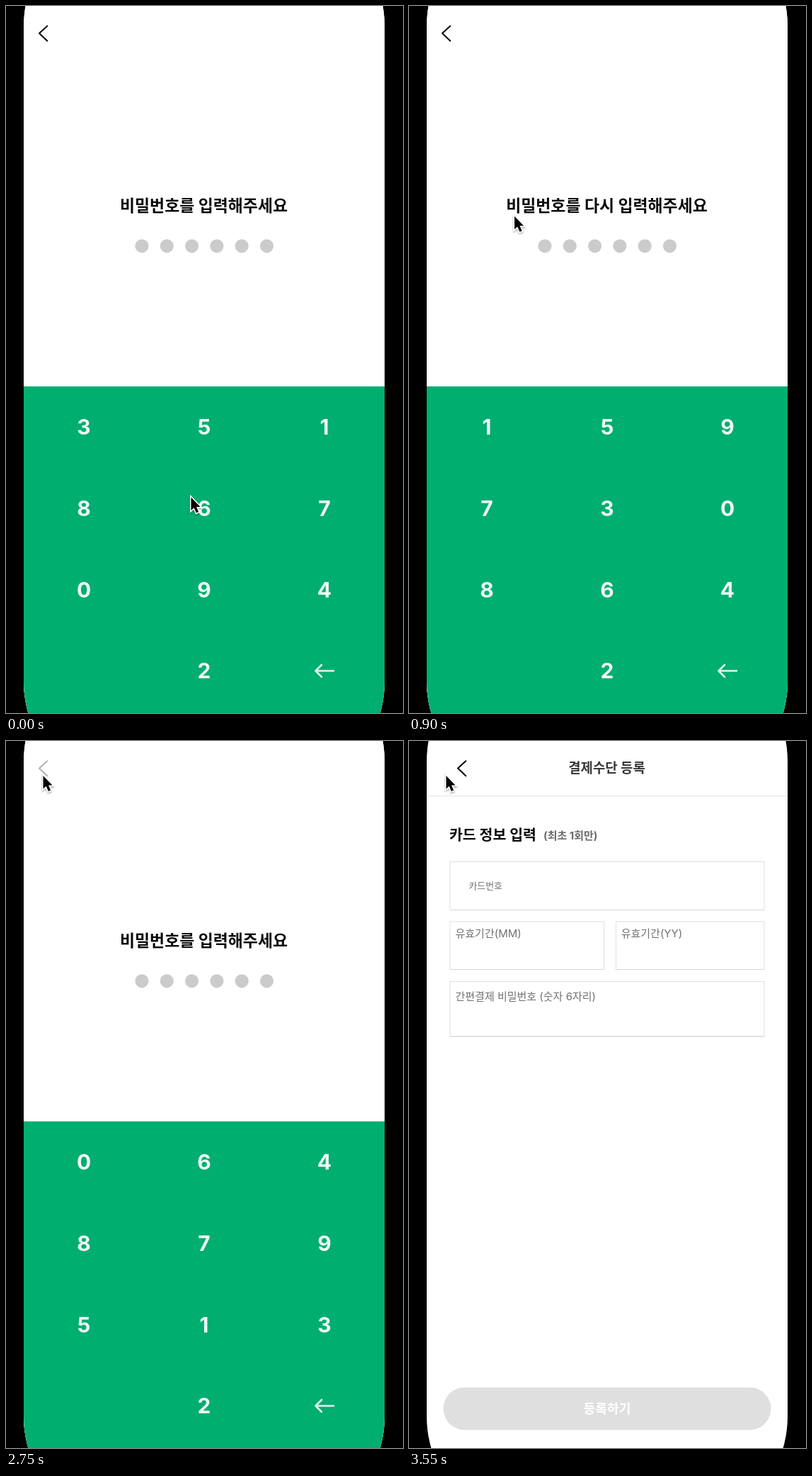
Animation, 561 px wide and 998 px high, one loop 3.74 s. Source, as an HTML page:

```html
<!DOCTYPE html>
<html lang="ko">
<head>
<meta charset="utf-8">
<title>비밀번호 입력</title>
<style>
  html, body { margin: 0; width: 100%; height: 100%; overflow: hidden; background: #000; }
  svg { display: block; width: 561px; height: 998px; }
  text { font-family: Inter, "Noto Sans CJK KR", "Noto Sans CJK JP", "Noto Sans CJK", sans-serif; }
  .b { font-weight: 700; }
  .key { font-weight: 700; font-size: 30px; fill: #fff; fill-opacity: .94; }
  .mid, .key { text-anchor: middle; }
  .hint { font-size: 15px; fill: #707070; }
  .box { fill: #fff; stroke: #dedede; }
  .line { fill: none; stroke-width: 2; stroke-linecap: round; stroke-linejoin: round; }
</style>
</head>
<body>
<svg viewBox="0 0 561 998">
  <defs>
    <clipPath id="phone"><rect x="25" y="-71" width="510" height="1124" rx="60" ry="100"/></clipPath>
    <filter id="soft" x="-50%" y="-50%" width="200%" height="200%">
      <feDropShadow dx="0" dy="1.5" stdDeviation="1.3" flood-opacity=".4"/>
    </filter>
    <path id="chevron" class="line" d="M58.3 28.2L47 38.5L58.3 49.3"/>
  </defs>
  <rect width="561" height="998" fill="#000"/>
  <g clip-path="url(#phone)">
    <rect x="25" width="510" height="998" fill="#fff"/>

    <g id="form">
      <rect x="25" y="77" width="510" height="1.2" fill="#e6e6e6"/>
      <use href="#chevron" x="22" stroke="#000"/>
      <text class="b mid" x="279.5" y="44.5" font-size="18.9" fill="#3a3a3a">결제수단 등록</text>
      <text class="b" x="57" y="140" font-size="20.5" fill="#0a0a0a">카드 정보 입력</text>
      <text class="b" x="190" y="138.5" font-size="15" fill="#6a6a6a">(최초 1회만)</text>
      <g id="boxes"></g>
      <text class="hint" x="84.5" y="209" style="font-size:12.9px">카드번호</text>
      <text class="hint" x="65.5" y="276.7">유효기간(MM)</text>
      <text class="hint" x="299.7" y="276.7">유효기간(YY)</text>
      <text class="hint" x="65.5" y="365.7">간편결제 비밀번호 (숫자 6자리)</text>
      <rect x="48.5" y="912.5" width="463" height="60" rx="30" fill="#dfdfdf"/>
      <text class="b mid" x="280" y="949" font-size="18.2" fill="#fff">등록하기</text>
    </g>

    <g id="pin">
      <rect x="25" width="510" height="998" fill="#fff"/>
      <use id="back" href="#chevron" stroke="#000"/>
      <text id="title" class="b mid" x="279.5" y="290" font-size="22.9" fill="#0a0a0a"></text>
      <g id="dots"></g>
      <rect x="25" y="537" width="510" height="461" fill="#00ae70"/>
      <rect id="lit" x="195" y="652" width="170" height="114.5" fill="#fff" opacity=".2"/>
      <g id="keys"></g>
      <path class="line" d="M463 938.5H437.5M446 930L437.5 938.5L446 947" stroke="#fff" stroke-opacity=".88" style="stroke-width:2.6"/>
    </g>

    <path id="cursor" d="M0 0V18.5L4.2 14.7L7.4 22L10.6 20.6L7.5 13.5H13Z" fill="#000" stroke="#fff" stroke-width="3" paint-order="stroke" filter="url(#soft)"/>
  </g>
</svg>
<script>
const LOOP = 3740, STEP = 50, WIDTH = 510;
const $ = id => document.getElementById(id);
const add = (parent, tag, attrs) => {
  const el = document.createElementNS('http://www.w3.org/2000/svg', tag);
  for (const k in attrs) el.setAttribute(k, attrs[k]);
  return parent.appendChild(el);
};
const move = (id, x, y = 0) => $(id).setAttribute('transform', `translate(${x} ${y})`);

const clamp = v => Math.min(1, Math.max(0, v));
const ramp = (t, from, to) => clamp((t - from) / (to - from));
const mix = (a, b, k) => a + (b - a) * k;
const sine = k => .5 - .5 * Math.cos(Math.PI * k);
const slide = t => 1 - Math.exp(-((Math.max(0, t - 3040) / 103.6) ** 2.43));
// Opacity of a button that dims when pressed and fades back after release
const press = (t, down, up, end) => t < down ? 1 : mix(.3, 1, ramp(t, up, end));

const ASK = '비밀번호를 입력해주세요', AGAIN = '비밀번호를 다시 입력해주세요';
const screens = [
  { from: 0, title: ASK, order: '3518670942' },
  { from: 550, title: AGAIN, order: '1597308642' },
  { from: 1600, title: ASK, order: '0648795132' }
];
const TAP = 80;

function box(x, y, width, height) {
  add($('boxes'), 'rect', { class: 'box', x, y, width, height });
  add($('boxes'), 'rect', { x, y: y + height - .5, width, height: 1, fill: '#d6d6d6' });
}
box(58, 170.5, 444, 68);
box(58, 255, 217.5, 67.5);
box(292.5, 255, 209.5, 67.5);
box(58, 339.5, 444, 77.5);

const dots = Array.from({ length: 6 }, (_, i) =>
  add($('dots'), 'circle', { cx: 192 + 35.3 * i, cy: 338.8, r: 9.6 }));
const keys = Array.from({ length: 10 }, (_, i) => {
  const col = i === 9 ? 1 : i % 3, row = Math.floor(i / 3);
  return add($('keys'), 'text', { class: 'key', x: 110 + 170 * col, y: 605.3 + 114.6 * row });
});

function draw(t) {
  const { title, order } = screens.filter(s => s.from <= t).pop();
  $('title').textContent = title;
  keys.forEach((key, i) => { key.textContent = order[i]; });

  const typing = t < screens[1].from ? t / TAP : 0;
  dots.forEach((dot, i) => dot.setAttribute('fill', i + 1 <= typing ? '#00ae70' : '#cbcbcb'));
  $('lit').setAttribute('visibility', typing > 0 && typing % 1 < .65 ? 'visible' : 'hidden');
  $('back').setAttribute('opacity', press(t, 1450, 1650, 2100) * press(t, 2750, 3100, 3200));

  const go = sine(ramp(t, 575, 1195));
  move('cursor', mix(261.5, 52.5, go), mix(693.5, 49, go ** .783));

  const p = slide(t);
  move('pin', WIDTH * p);
  move('form', -.3 * WIDTH * (1 - p));
}

const start = performance.now();
function tick() {
  const t = (performance.now() - start) % LOOP;
  draw(Math.floor(t / STEP) * STEP);
  requestAnimationFrame(tick);
}
tick();
</script>
</body>
</html>
```
